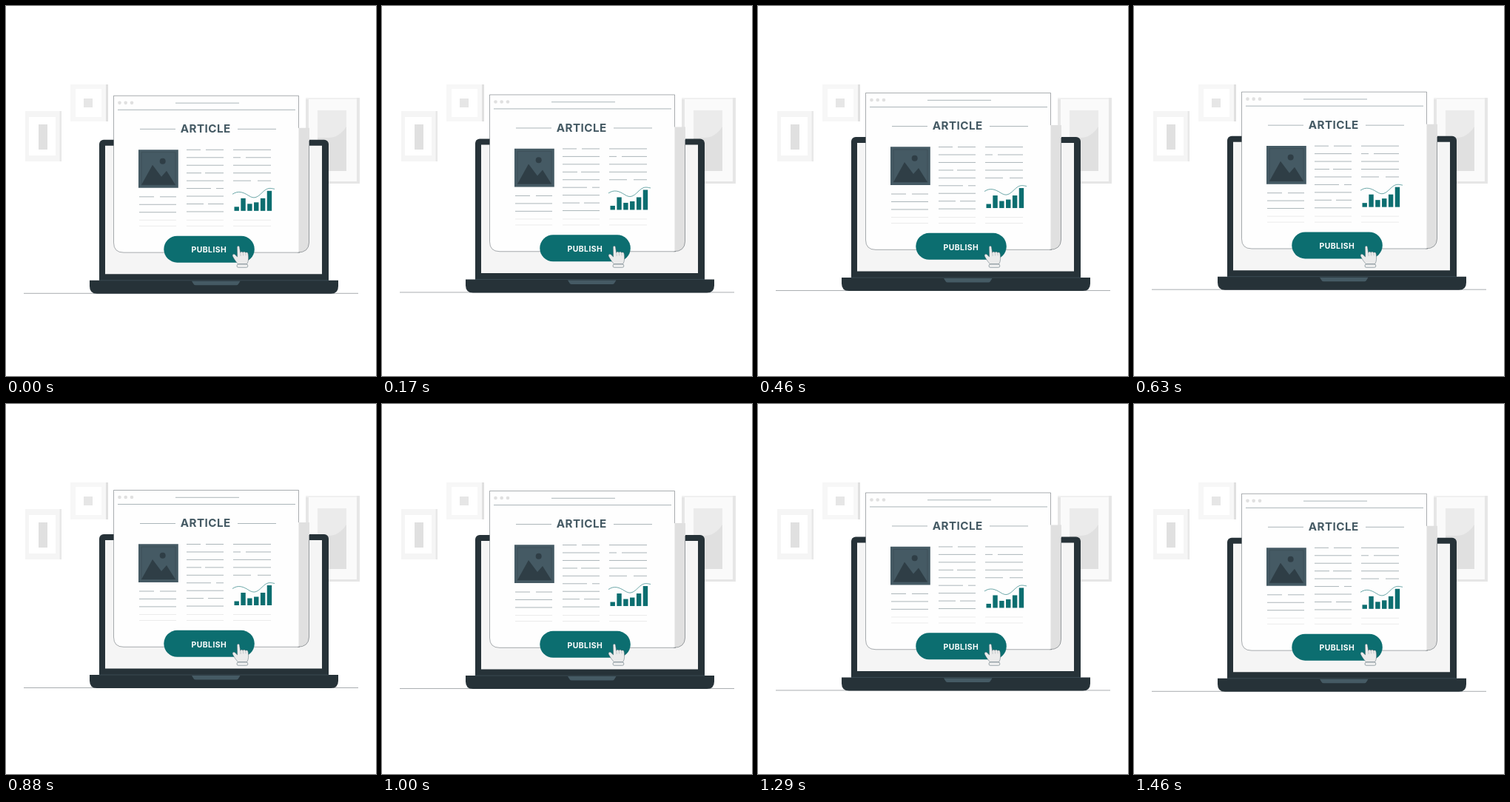
Write an HTML page that moves like this. It is 500 by 500 pixels and loops after 1500 ms.

```html
<!DOCTYPE html>
<html lang="en">
<head>
<meta charset="utf-8">
<title>Publish article</title>
<style>
  html, body { margin: 0; width: 100%; height: 100%; overflow: hidden; background: #fff; }
  svg { display: block; width: 100vw; height: 100vh; }
  text { font-family: Inter, "Open Sans", sans-serif; font-weight: 700; text-anchor: middle; }
  .thin { fill: none; stroke: #455a64; stroke-width: .45; }
  .edge { fill: none; stroke: #263238; stroke-width: .4; }
</style>
</head>
<body>
<svg viewBox="0 0 500 500">
  <g id="wall">
    <path fill="#f5f5f5" d="M26 142h49v68H26z"/>
    <path fill="#e8e8e8" d="M72.5 142H75v68h-2.5z"/>
    <path fill="#fff" d="M31 150h36v52H31z"/>
    <path fill="#e0e0e0" d="M44 160h12v34H44z"/>

    <path fill="#f7f7f7" d="M87 106h51v50H87z"/>
    <path fill="#e0e0e0" d="M135 106h3v50h-3z"/>
    <path fill="#fff" d="M94 112h35v38H94z"/>
    <path fill="#e6e6e6" d="M105 125h12v12h-12z"/>

    <path fill="#e6e6e6" d="M405 124h73v116h-73z"/>
    <path fill="#f0f0f0" d="M405 124h69v2h-69z"/>
    <path fill="#fafafa" d="M409 126h65v111h-65z"/>
    <path fill="#e0e0e0" d="M421 141h39v82h-39z"/>
    <path fill="#ebebeb" d="M421 141h39v22Q450 178 436 178h-15z"/>
  </g>

  <g id="float">
    <path class="edge" d="M24 388.500H476"/>
    <rect x="126" y="181" width="310" height="196" rx="6" fill="#263238"/>
    <path fill="#f5f5f5" d="M134 189H427V362.500H134z"/>
    <path fill="#263238" d="M113 371H449V379Q449 389 439 389H123Q113 389 113 379z"/>
    <path fill="none" stroke="#455a64" stroke-width=".6" d="M126 371H436"/>
    <path fill="#455a64" d="M251 372H316.500L314 376Q313.300 377.500 311 377.500H256.500Q254.300 377.500 253.500 376z"/>

    <path fill="#e0e0e0" d="M395 165H410V320Q409 333 395 333z"/>
    <path class="edge" d="M409.500 182V320Q409 333.300 394 333.300"/>
    <path fill="#fefefe" d="M145.500 121.500H395.500V333.300H159Q145.500 333.300 145.500 320z"/>
    <path class="edge" d="M395.500 165V121.500H145.500V320Q145.500 333.300 159 333.300H397"/>
    <g fill="#e0e0e0">
      <circle cx="153.500" cy="131" r="2.300"/>
      <circle cx="161.700" cy="131" r="2.300"/>
      <circle cx="170" cy="131" r="2.300"/>
    </g>
    <path class="thin" d="M151 140.500H391M229 131.300H315M181 166.500H229M313 166.500H365"/>
    <text x="269.700" y="171.200" font-size="15.200" letter-spacing=".45" fill="#455a64">ARTICLE</text>
    <g id="copy"></g>

    <path fill="#455a64" d="M179 194.300H232.800V246H179z"/>
    <path fill="none" stroke="#36474f" stroke-width=".5" d="M183 198H229V242H183z"/>
    <path fill="#2f3e46" d="M183 242L198 215 210 231 217 223 229 242z"/>
    <circle cx="211.700" cy="209.800" r="4" fill="#2f3e46"/>

    <g id="bars" fill="#0c6e70"></g>
    <path fill="none" stroke="#0c6e70" stroke-width=".6" d="M306 254.500C314 249 321 252 328 256.500S339 259.500 346 252.500S356 246 363 247.500"/>

    <rect x="213.300" y="310.800" width="122.500" height="36" rx="18" fill="#0c6e70"/>
    <text x="274.400" y="333.500" font-size="10.400" letter-spacing=".45" fill="#fff">PUBLISH</text>
  </g>

  <g id="cursor">
    <path fill="#ebebeb" stroke="#455a64" stroke-width=".45" stroke-linejoin="round"
      d="M312.300 326.500C312.200 323.700 315.300 323.700 315.600 326.200L316.600 333.200Q318.300 331 320.200 333Q322 331 323.700 333.200Q326.700 331.800 327.200 335C328 340 328 345 325.600 348.700H313.500C311 346 308.500 342.500 306.300 338.300C305.300 335.500 308.200 334 309.800 336.300L312.600 339z"/>
    <path fill="none" stroke="#9aa3a7" stroke-width=".5" d="M316.600 333.200L317.200 338M320.200 333L320.700 337.500M323.700 333.200L324 337.300"/>
    <rect x="312" y="349" width="14.800" height="4.300" rx="2" fill="#f0f0f0" stroke="#455a64" stroke-width=".5"/>
  </g>
</svg>
<script>
const $ = id => document.getElementById(id);

function add(parent, tag, attrs) {
  const el = document.createElementNS('http://www.w3.org/2000/svg', tag);
  for (const key in attrs) el.setAttribute(key, attrs[key]);
  parent.append(el);
}

// Each column: left, right, first row, row count, and gaps by row.
const columns = [
  { left: 180, right: 230, top: 258, rows: 3, gaps: { 0: [200, 208] } },
  { left: 244, right: 294, top: 194.5, rows: 9,
    gaps: { 0: [263, 270], 3: [264, 269], 5: [277, 284], 7: [267, 273] } },
  { left: 307, right: 358, top: 194.5, rows: 5,
    gaps: { 1: [317, 324], 4: [331, 340] } }
];

for (const { left, right, top, rows, gaps } of columns) {
  let d = '';
  for (let i = 0; i < rows; i++) {
    const y = top + i * 10.45;
    const gap = gaps[i];
    d += gap ? `M${left} ${y}H${gap[0]}M${gap[1]} ${y}H${right}` : `M${left} ${y}H${right}`;
  }
  add($('copy'), 'path', { d, class: 'thin' });
  add($('copy'), 'path', {
    d: `M${left} 289.500H${right}M${left} 297.500H${right}`,
    fill: 'none', stroke: '#e0e0e0', 'stroke-width': .6
  });
}

[5.5, 17, 9.5, 11.5, 17, 27].forEach((height, i) =>
  add($('bars'), 'rect', { x: 308.5 + i * 8.85, y: 277 - height, width: 6.4, height }));

const LOOP = 1500, STEPS = 36, LIFT = 6.2;
const start = performance.now();

// Rises and falls at constant speed, in 24 steps per second.
function draw() {
  const t = (performance.now() - start) % LOOP;
  const step = Math.floor((t + 5) / LOOP * STEPS) % STEPS;
  const phase = (step + .5) / STEPS;
  const y = -LIFT * (1 - Math.abs(2 * phase - 1));
  $('float').setAttribute('transform', `translate(0 ${y.toFixed(3)})`);
  requestAnimationFrame(draw);
}
draw();
</script>
</body>
</html>
```
